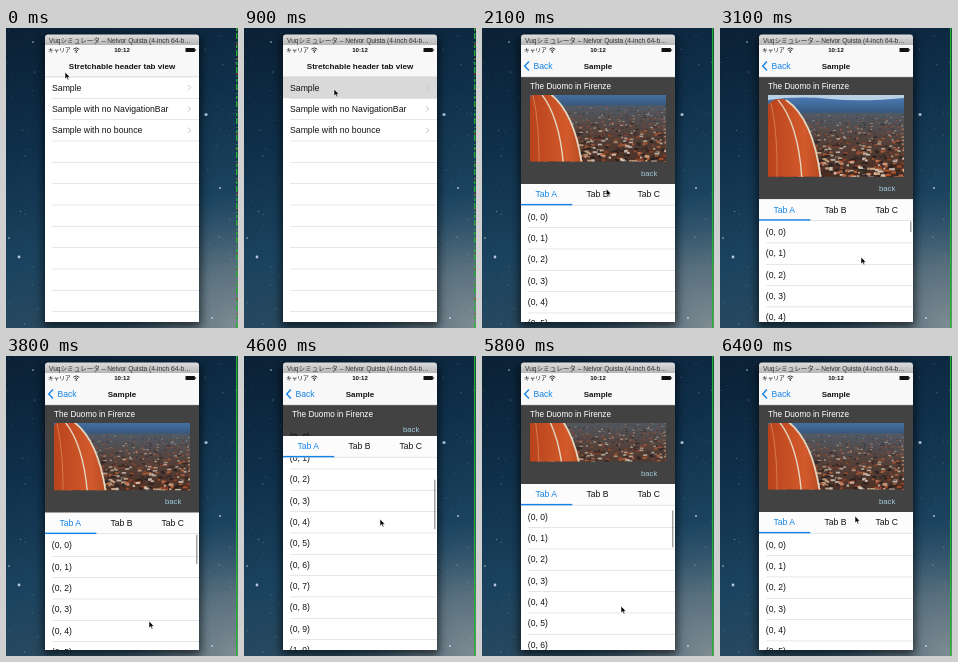
An HTML page that plays this animation: 232x300 px, repeating every 6500 ms.

```html
<!DOCTYPE html>
<html lang="en">
<head>
<meta charset="utf-8">
<title>Stretchable header tab view</title>
<style>
  html, body { margin: 0; width: 100%; height: 100%; overflow: hidden; background: #10283c; }
  svg { display: block; }
  #stage { width: 100%; height: 100%; }
  text { font-family: "Liberation Sans", "Noto Sans CJK JP", "Noto Sans CJK", sans-serif; white-space: pre; }
</style>
</head>
<body>
<svg id="stage" viewBox="0 0 232 300">
  <defs>
    <linearGradient id="sky" x1="0" y1="0" x2=".25" y2="1">
      <stop offset="0" stop-color="#0b2034"/><stop offset=".4" stop-color="#0f304b"/>
      <stop offset=".75" stop-color="#1b435f"/><stop offset="1" stop-color="#2a4a5f"/>
    </linearGradient>
    <radialGradient id="haze" gradientUnits="userSpaceOnUse" cx="228" cy="298" r="135">
      <stop offset="0" stop-color="#8d979b" stop-opacity=".85"/>
      <stop offset=".45" stop-color="#7d8d96" stop-opacity=".55"/>
      <stop offset="1" stop-color="#4a7188" stop-opacity="0"/>
    </radialGradient>
    <linearGradient id="bar" x2="0" y2="1">
      <stop offset="0" stop-color="#dedede"/><stop offset="1" stop-color="#b3b3b3"/>
    </linearGradient>
    <linearGradient id="edge">
      <stop offset="0" stop-color="#000" stop-opacity="0"/><stop offset="1" stop-color="#000" stop-opacity=".16"/>
    </linearGradient>
    <linearGradient id="hills" x2="0" y2="1">
      <stop offset="0" stop-color="#4a78b4"/><stop offset="1" stop-color="#33506f"/>
    </linearGradient>
    <linearGradient id="town" x2="0" y2="1">
      <stop offset="0" stop-color="#4f5a66"/><stop offset=".4" stop-color="#54423c"/><stop offset="1" stop-color="#4a2a1c"/>
    </linearGradient>
    <linearGradient id="tiles">
      <stop offset="0" stop-color="#b9431c"/><stop offset=".7" stop-color="#d25a2c"/><stop offset="1" stop-color="#b54a22"/>
    </linearGradient>
    <filter id="soft" x="-20%" y="-20%" width="140%" height="140%"><feGaussianBlur stdDeviation="4"/></filter>
    <clipPath id="screen"><rect x="39" y="17" width="154" height="277"/></clipPath>
  </defs>

  <rect width="232" height="300" fill="url(#sky)"/>
  <rect width="232" height="300" fill="url(#haze)"/>
  <g id="stars" fill="#cfe2f2"></g>
  <rect x="37" y="9" width="158" height="290" rx="4" opacity=".6" filter="url(#soft)"/>
  <path d="M39 18V9.5Q39 6.5 42 6.5H190Q193 6.5 193 9.5V18Z" fill="url(#bar)"/>
  <g id="caption"></g>

  <g clip-path="url(#screen)">
    <rect x="39" y="17" width="154" height="277" fill="#fff"/>
    <g id="menu"><rect id="pressed" x="39" y="49" width="154" height="21.3" fill="#d9d9d9"/></g>
    <rect id="dim" x="39" y="49" width="154" height="245"/>
    <g id="page">
      <rect x="33" y="49" width="6" height="245" fill="url(#edge)"/>
      <rect x="39" y="49" width="154" height="245" fill="#fff"/>
      <g id="rows"></g>
      <rect id="header" x="39" y="49" width="154" fill="#000" fill-opacity=".74"/>
      <svg id="photo" x="48" y="67" width="136" viewBox="0 0 136 90" preserveAspectRatio="xMidYMid slice">
        <rect width="136" height="12" fill="#b9cfe4"/>
        <path d="M0 9Q30 5 62 8T136 7V26H0Z" fill="url(#hills)"/>
        <rect y="22" width="136" height="68" fill="url(#town)"/>
        <g id="houses"></g>
        <path d="M0 14Q6 6 18 9Q46 28 53 90H0Z" fill="url(#tiles)"/>
        <g fill="none" stroke="#e2d6c0">
          <path d="M18 9Q46 28 53 90" stroke-width="1.8"/>
          <path d="M10 9Q31 34 34 90" stroke-width="1.4"/>
          <path d="M3 12Q10 42 9 90" stroke-width=".8" stroke="#d98a5c"/>
        </g>
      </svg>
      <g id="headerText"></g>
      <g id="tabs">
        <rect x="39" width="154" height="21.3" fill="#fcfcfc"/>
        <rect x="39" y="20.9" width="154" height=".5" fill="#c8c8cc"/>
        <rect x="39" y="19.9" width="51.3" height="1.4" fill="#1583e6"/>
      </g>
      <rect id="thumb" x="190" width="1.5" rx=".75" fill="#000"/>
    </g>
    <rect x="39" y="17" width="154" height="32" fill="#f8f8f8" fill-opacity=".97"/>
    <rect x="39" y="48.7" width="154" height=".5" fill="#b8b8ba"/>
    <g id="status">
      <path d="M67.3 21.2Q70.3 18.6 73.3 21.2M68.6 22.6Q70.3 21.2 72 22.6" fill="none" stroke="#222" stroke-width=".9"/>
      <circle cx="70.3" cy="24" r=".8"/>
      <rect x="179.5" y="20" width="9.4" height="4" rx=".6" fill="#111"/>
      <rect x="189.3" y="21.2" width=".8" height="1.6" fill="#111"/>
    </g>
    <g id="nav"><path id="chevron" d="M47 33.6L42.7 38L47 42.4" fill="none" stroke="#1583e6" stroke-width="1.4"/></g>
  </g>

  <path id="seamRed" d="M231 0V300" stroke="#b0302a" stroke-width="1" stroke-dasharray="2 13"/>
  <path id="seam" d="M230.7 0V300" stroke="#22b52c" stroke-width="1.3"/>
  <path id="cursor" d="M0 0V7L1.6 5.6L2.7 8.1L3.9 7.6L2.8 5.2H5Z" fill="#000" stroke="#fff" stroke-width=".6"/>
</svg>
<script>
const LOOP = 6500, STEP = 100, ROW = 21.33, BLUE = '#1583e6';
const $ = id => document.getElementById(id);

function add(parent, tag, attrs, content) {
  const el = document.createElementNS('http://www.w3.org/2000/svg', tag);
  set(el, attrs);
  if (content) el.textContent = content;
  return parent.appendChild(el);
}
function set(el, attrs) {
  for (const key in attrs) el.setAttribute(key, attrs[key]);
}
// The given y is the vertical middle of the capitals.
function label(parent, x, y, content, size, attrs = {}) {
  return add(parent, 'text', { x, y: y + size * 0.36, 'font-size': size, fill: '#111', ...attrs }, content);
}
function randomizer(seed) {
  return () => (seed = (seed * 16807) % 2147483647) / 2147483647;
}
const middle = { 'text-anchor': 'middle' };
const bold = { ...middle, 'font-weight': 'bold' };

function buildDesktop() {
  const rnd = randomizer(77);
  for (let i = 0; i < 90; i++) {
    const x = rnd() < 0.5 ? rnd() * 38 : 194 + rnd() * 36;
    add($('stars'), 'circle', { cx: x, cy: rnd() * 300, r: 0.2 + rnd() * 0.35, opacity: 0.2 + rnd() * 0.5 });
  }
  for (const [cx, cy, r] of [[13, 229, 1.4], [200, 86.5, 1.6], [3, 210, .8], [206, 290, .9], [214, 160, .9], [27, 14, .8]])
    add($('stars'), 'circle', { cx, cy, r, opacity: 0.85 });
  label($('caption'), 43, 12.2, 'Vuqシミュレータ – Nelvor Quista (4-inch 64-b…', 6.6, { fill: '#333' });
  label($('status'), 42, 22.2, 'キャリア', 5.7);
  label($('status'), 116, 22.2, '10:12', 6.1, bold);
}

function buildMenu() {
  const menu = $('menu');
  ['Sample', 'Sample with no NavigationBar', 'Sample with no bounce'].forEach((name, i) => {
    const y = 59.6 + i * ROW;
    label(menu, 46, y, name, 8.7);
    add(menu, 'path', { d: `M182 ${y - 2.7}l2.7 2.7l-2.7 2.7`, fill: 'none', stroke: '#c4c4c8' });
  });
  for (let i = 1; i < 12; i++)
    add(menu, 'rect', { x: 46, y: 48.8 + i * ROW, width: 147, height: 0.5, fill: '#cfcfd2' });
}

function buildPage() {
  for (let i = 0; i < 30; i++) {
    const y = 188.7 + i * ROW;
    label($('rows'), 45.8, y, `(${Math.floor(i / 10)}, ${i % 10})`, 8.6);
    add($('rows'), 'rect', { x: 46, y: y + ROW / 2, width: 147, height: 0.5, fill: '#cfcfd2' });
  }
  ['Tab A', 'Tab B', 'Tab C'].forEach((name, i) =>
    label($('tabs'), 64.3 + i * 51.2, 10.4, name, 8.6, { ...middle, fill: i ? '#111' : BLUE }));
  label($('headerText'), 48, 57.6, 'The Duomo in Firenze', 8.2, { fill: '#fff' });

  const rnd = randomizer(4211), count = 800;
  const tones = ['#b5532c', '#d8b593', '#2b2524', '#97452a', '#d9d0c4', '#3d2b25', '#c06a42', '#201c20'];
  for (let i = 0; i < count; i++) {
    const depth = i / count, size = 1.2 + depth * 3;
    add($('houses'), 'rect', {
      x: rnd() * 136, y: 23 + depth * 66, width: size * (0.6 + rnd()), height: size * 0.6,
      fill: tones[Math.floor(rnd() * tones.length)], opacity: 0.45 + depth * 0.5
    });
  }
}

buildDesktop();
buildMenu();
buildPage();
const back = label($('headerText'), 159, 0, 'back', 7.7, { fill: '#9fcbd9' });
const menuTitle = label($('nav'), 116, 38, 'Stretchable header tab view', 8.05, bold);
const pageTitle = label($('nav'), 116, 38, 'Sample', 8.05, bold);
const backLabel = label($('nav'), 51.5, 38, 'Back', 8.6, { fill: BLUE });

// Share of the page still off screen.
const push = [[1000, 1], [1100, .85], [1200, .5], [1300, .27], [1400, .118], [1500, .04], [1600, 0]];
const scroll = [[2700, 0], [3100, -15.3], [3500, -32], [3600, -18], [3700, -6], [3800, -.7], [3900, 0],
  [4050, 0], [4300, 45], [4600, 108], [4800, 162], [5000, 203], [5100, 206], [5300, 189], [5600, 110],
  [5800, 28], [5900, 0]];
const pointer = [[0, 59, 44], [300, 62, 46], [700, 90, 60], [1100, 90, 62], [1400, 90, 74], [2400, 139, 198],
  [2700, 140, 200], [3100, 141, 229], [3500, 143, 265], [4050, 143, 265], [4600, 136, 163], [5000, 137, 176],
  [5300, 138, 198], [5600, 139, 250], [5900, 139, 250], [6400, 135, 160]];
const thumbFade = [[2700, 0], [2800, .36], [5900, .36], [6200, 0]];

function at(keys, t) {
  const next = keys.findIndex(key => key[0] > t);
  if (next === 0) return keys[0].slice(1);
  if (next < 0) return keys[keys.length - 1].slice(1);
  const a = keys[next - 1], b = keys[next], k = (t - a[0]) / (b[0] - a[0]);
  return a.slice(1).map((v, i) => v + (b[i + 1] - v) * k);
}

function drawPush(t) {
  const [left] = at(push, t), done = 1 - left;
  set($('menu'), { transform: `translate(${-46 * done})` });
  set($('pressed'), { opacity: t >= 900 && t < 1600 ? 1 : 0 });
  set($('dim'), { opacity: 0.1 * done });
  set($('page'), { transform: `translate(${154 * left})`, visibility: left < 1 ? 'visible' : 'hidden' });
  set(menuTitle, { x: 116 - 55 * done, opacity: left ** 1.4 });
  set(pageTitle, { x: 116 + 100 * left, opacity: done });
  set(backLabel, { x: 51.5 + 55 * left, opacity: done });
  set($('chevron'), { opacity: left < 0.1 ? 1 : 0 });
}

function drawScroll(t) {
  const [offset] = at(scroll, t);
  const tabTop = Math.max(80, 156 - offset);
  set($('rows'), { transform: `translate(0 ${-offset})` });
  set($('header'), { height: tabTop - 49 });
  set($('photo'), { height: Math.max(0, tabTop - 89.5) });
  set(back, { y: Math.max(73, tabTop - 11) + 2.6 });
  set($('tabs'), { transform: `translate(0 ${tabTop})` });

  const top = tabTop + 22, room = 294 - top, length = room * 0.26;
  const y = top + 0.0014 * Math.max(0, offset) * (room - length);
  const [opacity] = at(thumbFade, t);
  set($('thumb'), { y, height: Math.max(4, length + Math.min(0, offset)), opacity });
}

function frame(now) {
  const t = Math.floor(now % LOOP / STEP) * STEP;
  drawPush(t);
  drawScroll(t);
  set($('cursor'), { transform: `translate(${at(pointer, t)})` });
  set($('seam'), { 'stroke-dasharray': t < 1500 ? '3 2 6 3 1 2' : 'none' });
  set($('seamRed'), { opacity: t < 1500 ? 1 : 0 });
  requestAnimationFrame(frame);
}
frame(0);
</script>
</body>
</html>
```
